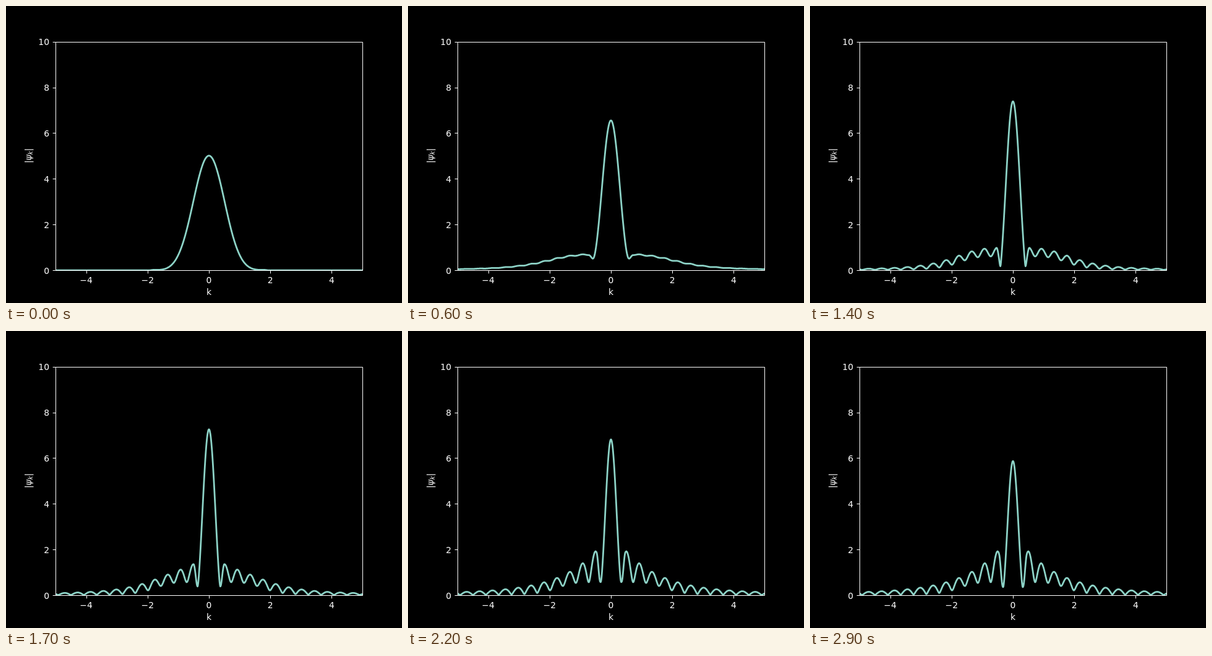
An HTML page that plays this animation: 640x480 px, repeating every 3 s.

```html
<!DOCTYPE html>
<html lang="en">
<head>
<meta charset="utf-8">
<title>Momentum distribution</title>
<style>
  html, body { margin: 0; width: 100%; height: 100%; overflow: hidden; background: #000; }
  svg { display: block; width: 640px; height: 480px; }
  text { font: 13.89px "DejaVu Sans", sans-serif; fill: #fff; }
  .it { font-style: italic; }
  .sub { font-size: 9.72px; }
</style>
</head>
<body>
<svg viewBox="0 0 640 480">
  <clipPath id="area"><rect x="80" y="57.6" width="496" height="369.6"/></clipPath>
  <rect width="640" height="480"/>
  <path id="curve" clip-path="url(#area)" fill="none" stroke="#8dd3c7" stroke-width="2.78" stroke-linejoin="round"/>
  <path id="axes" fill="none" stroke="#fff"/>
  <g id="labels"></g>
  <text x="328" y="467" text-anchor="middle">k</text>
  <text transform="translate(41 242) rotate(-90)" text-anchor="middle">|<tspan class="it">ψ</tspan><tspan class="it sub" dy="2.2">k</tspan><tspan dy="-2.2">|</tspan></text>
</svg>
<script>
const STEP = 100, COUNT = 30;
const px = k => 328 + 49.6 * k;
const py = v => 427.2 - 36.96 * v;
const sq = x => x * x;
const mix = (a, b, u) => a + (b - a) * u;
const smooth = (a, b, x) => {
  const u = Math.min(1, Math.max(0, (x - a) / (b - a)));
  return u * u * (3 - 2 * u);
};

// Shape-preserving cubic through [x, y] key points.
function spline(...keys) {
  const n = keys.length, d = [];
  for (let i = 0; i < n - 1; i++)
    d.push((keys[i + 1][1] - keys[i][1]) / (keys[i + 1][0] - keys[i][0]));
  const m = keys.map((_, i) => {
    if (i === 0) return d[0];
    if (i === n - 1) return d[n - 2];
    const p = d[i - 1] * d[i];
    return p > 0 ? 2 * p / (d[i - 1] + d[i]) : 0;
  });
  return x => {
    let i = 0;
    while (i < n - 2 && x > keys[i + 1][0]) i++;
    const [x0, y0] = keys[i], [x1, y1] = keys[i + 1];
    const h = x1 - x0, u = (x - x0) / h, w = 1 - u;
    return y0 * w * w * (1 + 2 * u) + y1 * u * u * (1 + 2 * w)
      + h * u * w * (m[i] * w - m[i + 1] * u);
  };
}

// Central lobe over time (in steps): height, edge, steepness, level at the edge.
const peak = spline([0, 5.013], [4, 6.17], [9, 7], [13, 7.4], [20, 7.05], [25, 6.36], [29, 5.87]);
const edge = spline([0, 1.8], [4, .76], [9, .46], [14, .41], [20, .343], [29, .32]);
const steep = spline([0, 5.32], [4, 1.78], [9, .95], [14, .9], [29, .9]);
const level = spline([0, .02], [4, .66], [9, .22], [14, .18], [20, .6], [29, .36]);

// |psi| as a function of k at step t.
function profile(t) {
  const p = peak(t), z = edge(t), b = steep(t), base = level(t);
  const grow = smooth(0, 9, t);
  const depth = .15 + .85 * smooth(8, 15.5, t);
  const sharpen = smooth(13, 22, t);
  const amp = .93 * grow, reach = 3 - .95 * grow;

  // Side waves: crests and dips bound a ripple with a fixed period in k.
  function side(k) {
    const hump = amp * (1 / (1 + (k / reach) ** 4) + .04);
    const crest = mix(hump, 2.75 * Math.exp(-.8 * k) + .09, sharpen);
    const dip = mix(hump, amp * (.6 / (1 + (k / 1.8) ** 6) + .02), depth);
    return mix(sq(dip), sq(crest), sq(Math.sin(Math.PI * (k - .305) / .419)));
  }

  return k => {
    const r2 = sq(k / z);
    if (r2 > 1) return Math.sqrt(mix(sq(base), side(k), smooth(z, z + .13, k)));
    const lobe = p * (1 - r2) * Math.exp(-b * r2);
    return Math.sqrt(sq(lobe) + sq(base) * r2 * (2 - r2));
  };
}

function drawAxes() {
  const snap = v => Math.floor(v + .5) + .5;
  let d = "M80.5 58.5H576.5V427.5H80.5Z", labels = "";
  for (let k = -4; k <= 4; k += 2) {
    d += `M${snap(px(k))} 427.5v4.86`;
    labels += `<text x="${px(k)}" y="448" text-anchor="middle">${String(k).replace("-", "−")}</text>`;
  }
  for (let v = 0; v <= 10; v += 2) {
    d += `M80.5 ${snap(py(v))}h-4.86`;
    labels += `<text x="70" y="${Math.round(py(v) + 5.3)}" text-anchor="end">${v}</text>`;
  }
  document.getElementById("axes").setAttribute("d", d);
  document.getElementById("labels").innerHTML = labels;
}

const curve = document.getElementById("curve");
let shown = -1;

function draw(t) {
  const f = profile(t), pts = [];
  for (let i = -500; i <= 500; i++) {
    const k = i / 100;
    pts.push(px(k).toFixed(2) + " " + py(f(Math.abs(k))).toFixed(2));
  }
  curve.setAttribute("d", "M" + pts.join("L"));
}

function tick() {
  const t = Math.floor(performance.now() / STEP) % COUNT;
  if (t !== shown) draw(shown = t);
  requestAnimationFrame(tick);
}

drawAxes();
tick();
</script>
</body>
</html>
```
